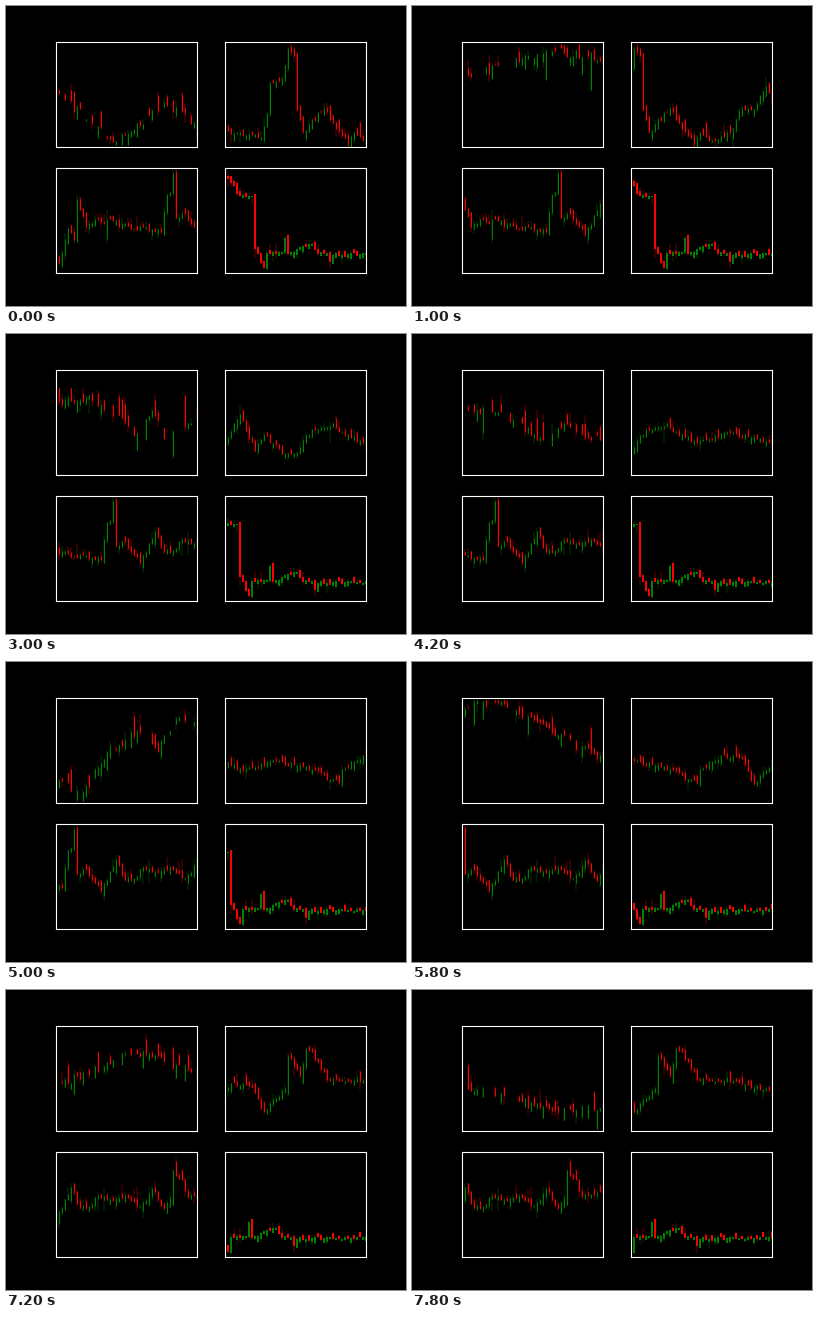
A matplotlib script for the animation above (8 s loop, 400 px wide and 300 px high).

```python
import numpy as np
import matplotlib.pyplot as plt
from matplotlib.animation import FuncAnimation
from matplotlib.collections import LineCollection

DPI = 100
PX = 72 / DPI
FRAMES, INTERVAL = 40, 200
SLOTS = 47
HEIGHT = 105
UP, DOWN = "#008000", "#ff0000"

# turning points of each chart: (candle index, level in stage pixels)
FAST = [
    (0, 88), (18, 136), (24, 125), (35, 96), (45, 116), (130, 45), (180, 68),
    (195, 120), (200, 80), (211, 125), (225, 120), (280, 45), (300, 68),
    (312, 66), (327, 103), (331, 76), (335, 105), (345, 82), (362, 42),
    (420, 74), (432, 78), (445, 103), (454, 90), (465, 106), (500, 118),
    (508, 130), (516, 90), (528, 65), (533, 90), (538, 58), (545, 60),
    (590, 40), (630, 105), (660, 96), (672, 45), (684, 55), (702, 120),
    (745, 62), (780, 98), (812, 122), (825, 118),
]
MEDIUM = [
    (0, 125), (11, 131), (13, 107), (14, 76), (18, 72), (20, 42), (22, 50),
    (23, 104), (25, 126), (32, 102), (40, 139), (42, 126), (46, 134),
    (52, 127), (55, 104), (60, 103), (64, 80), (69, 117), (72, 100),
    (78, 120), (83, 118), (86, 101), (95, 89), (97, 98), (105, 109),
    (115, 98), (128, 107), (137, 121), (138, 107), (145, 93), (152, 97),
    (156, 122), (163, 98), (164, 65), (168, 86), (170, 58), (172, 62),
    (177, 90), (189, 90), (201, 100),
]
SLOW = [
    (0, 257), (3, 222), (5, 234), (6, 193), (9, 221), (12, 213), (34, 226),
    (36, 188), (37, 186), (38, 167), (39, 212), (42, 208), (47, 229),
    (52, 197), (54, 214), (57, 219), (61, 205), (66, 211), (70, 205),
    (75, 216), (79, 198), (83, 219), (85, 207), (86, 180), (89, 190),
    (91, 207), (98, 203),
]
SLOWEST = [
    (0, 173), (4, 190), (8, 190), (9, 243), (12, 262), (13, 247), (18, 246),
    (19, 232), (20, 248), (28, 238), (30, 248), (33, 247), (34, 256),
    (35, 249), (59, 248),
]


def candles(keys, rng, jitter, overlap, wick, blank=0.0):
    """Rows of open, close, top and bottom along a roughened path."""
    xs, ys = np.array(keys).T
    i = np.arange(xs[-1] + 1)
    noise = np.where(np.isin(i, xs), 0, rng.uniform(-jitter, jitter, len(i)))
    close = np.interp(i, xs, ys) + noise
    before = np.concatenate([[close[0] - 2], close[:-1]])
    # each body reaches a little back past the candle before it
    side = np.where(before < close, -1, 1)
    start = before + side * (1 + rng.exponential(overlap, len(i)))
    top = np.minimum(start, close) - rng.exponential(wick, len(i))
    low = np.maximum(start, close) + rng.exponential(wick, len(i))
    rows = np.column_stack([start, close, top, low])
    quiet = rng.random(len(i)) < blank
    rows[quiet] = close[quiet, None]
    return rows


class Panel:
    def __init__(self, ax, top, rows, rate, body_px):
        self.rows, self.rate = rows, rate
        ax.set(xlim=(0, SLOTS), ylim=(top + HEIGHT, top), xticks=[],
               yticks=[], facecolor="black")
        for spine in ax.spines.values():
            spine.set_color("white")
        self.wicks = LineCollection([], linewidths=0.28)
        self.bodies = LineCollection([], linewidths=body_px * PX)
        for part in (self.wicks, self.bodies):
            ax.add_collection(part, autolim=False)

    def draw(self, frame):
        start = round(frame * self.rate)
        rows = self.rows[start:start + SLOTS]
        x = np.arange(1, len(rows) + 1)
        xx = np.column_stack([x, x])
        colors = [UP if c < o else DOWN for o, c in rows[:, :2]]
        for part, ends in ((self.bodies, rows[:, :2]), (self.wicks, rows[:, 2:])):
            part.set_segments(np.stack([xx, ends], axis=2))
            part.set_color(colors)


rng = np.random.default_rng(11)
fast = np.clip(candles(FAST, rng, 5, 5, 2.5, blank=0.3), 38, 139)
medium = candles(MEDIUM, rng, 3, 2, 2)
slow = candles(SLOW, rng, 3, 2, 2.5)
slowest = candles(SLOWEST, rng, 2, 1.5, 1.8)

fig, axes = plt.subplots(2, 2, figsize=(4, 3), dpi=DPI, facecolor="black")
fig.subplots_adjust(left=0.125, right=0.9, bottom=0.11, top=0.88,
                    wspace=0.2, hspace=0.2)
(a, b), (c, d) = axes
panels = [
    Panel(a, 36, fast, 20, 1),
    Panel(b, 36, medium, 4, 1),
    Panel(c, 162, slow, 4 / 3, 1),
    Panel(d, 162, slowest, 1 / 3, 2),
]


def update(frame):
    for panel in panels:
        panel.draw(frame)
    return []


anim = FuncAnimation(fig, update, frames=FRAMES, interval=INTERVAL,
                     init_func=lambda: update(0), repeat=True, repeat_delay=0)
plt.show()
```
